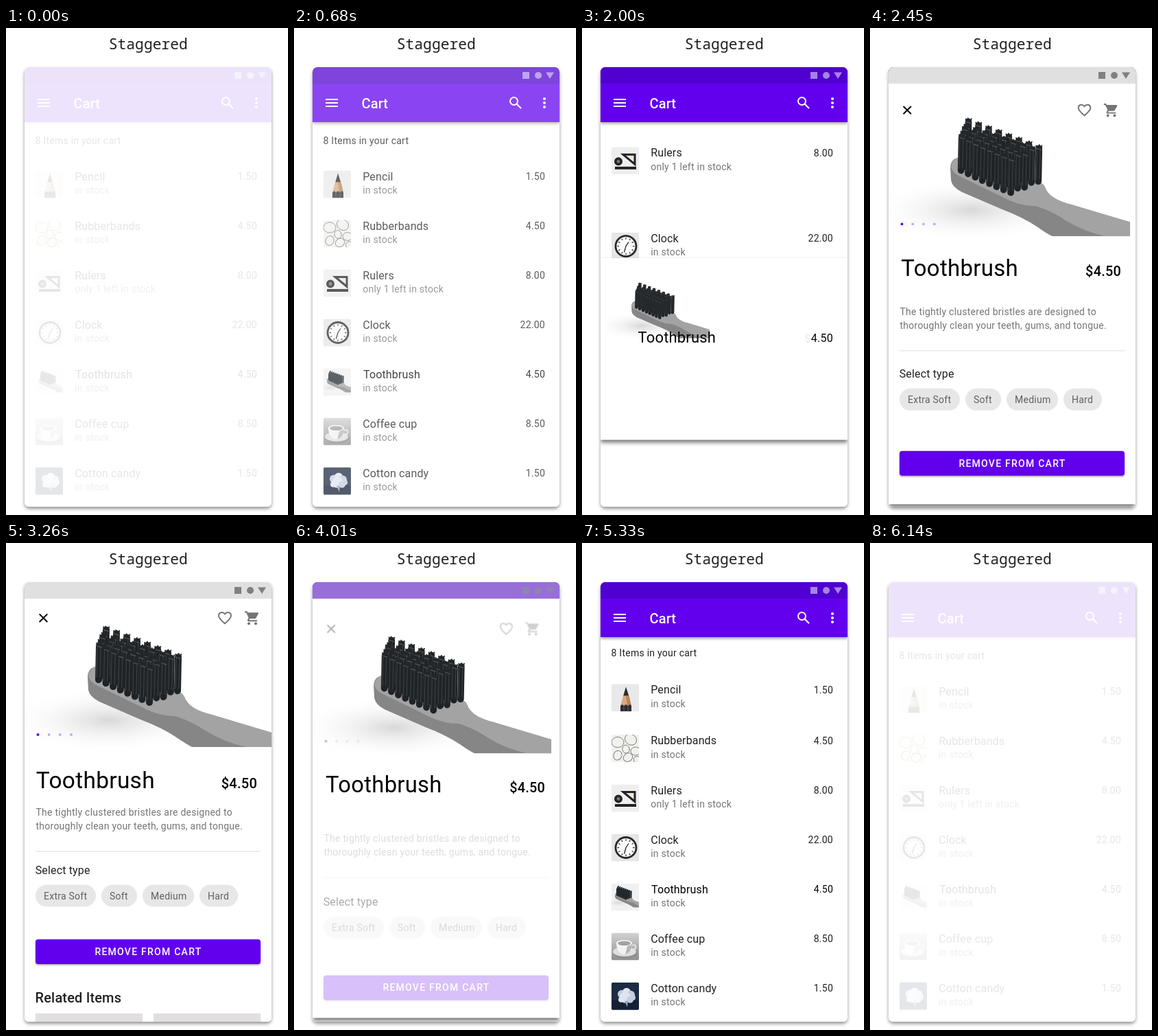
Recreate the animation shown at these times as an HTML page. Size 411 by 709 pixels, loop 8000 ms.

```html
<!DOCTYPE html>
<html lang="en">
<head>
<meta charset="utf-8">
<title>Staggered</title>
<style>
html, body { margin: 0; width: 100%; height: 100%; overflow: hidden; background: #fff; }
svg { display: block; width: 100vw; height: 100vh; }
text { font-family: Roboto, sans-serif; font-size: 14px; letter-spacing: .25px; fill: #212121; white-space: pre; }
.mono { font-family: "Noto Sans Mono", monospace; font-size: 21.3px; letter-spacing: 0; }
.item { font-size: 16px; letter-spacing: .15px; }
.dim { fill: #757575; }
.end { text-anchor: end; }
.head { font-size: 20px; font-weight: 500; letter-spacing: .15px; }
.chip { fill: #606060; }
.btn { fill: #fff; font-weight: 500; letter-spacing: 1.25px; text-anchor: middle; }
</style>
</head>
<body>
<svg id="stage" viewBox="0 0 411 709" xmlns="http://www.w3.org/2000/svg"></svg>
<script>
const LOOP = 8000, OPEN = 1334, CLOSE = 3620, SPAN = 1470;

const clamp = v => Math.min(1, Math.max(0, v));
const lerp = (a, b, p) => a + (b - a) * p;
const ramp = (t, a, b) => clamp((t - a) / (b - a));
const mix = (a, b, p) => `rgb(${a.map((v, i) => Math.round(lerp(v, b[i], p)))})`;
const quart = u => (u = clamp(u)) < .5 ? 8 * u ** 4 : 1 - 8 * (1 - u) ** 4;

const rect = (x, y, w, h, fill, more = '') =>
  `<rect x="${x}" y="${y}" width="${w}" height="${h}" fill="${fill}" ${more}/>`;
const circle = (x, y, r, fill, more = '') =>
  `<circle cx="${x}" cy="${y}" r="${r}" fill="${fill}" ${more}/>`;
const path = (d, fill, more = '') => `<path d="${d}" fill="${fill}" ${more}/>`;
const line = (d, color, w, more = '') => path(d, 'none', `stroke="${color}" stroke-width="${w}" ${more}`);
const text = (x, y, s, cls = '', more = '') => `<text x="${x}" y="${y}" class="${cls}" ${more}>${s}</text>`;

// Thumbnails, drawn in a 40 by 40 box
const loops = [[9, 11, 9], [28, 7, 9], [21, 21, 6], [9, 30, 7], [24, 33, 7], [35, 24, 7], [38, 37, 6]];
const ticks = Array.from({ length: 12 }, (_, i) => {
  const a = i * Math.PI / 6, x = Math.cos(a), y = Math.sin(a);
  return `M${21 + x * 10} ${20 + y * 10}L${21 + x * 12.5} ${20 + y * 12.5}`;
}).join('');
const puffs = [[15, 17, 6], [22, 14, 6], [28, 18, 6], [20, 22, 8], [27, 25, 5], [14, 25, 4], [31, 22, 4]];

const thumbs = {
  pencil: rect(0, 0, 40, 40, '#e9e9eb') +
    path('M21 4L25.5 18H17Z', '#2b2b2d') +
    path('M17 17H25.5L29 32H13Z', '#d8aa80') + path('M21 17H25.5L29 32H23Z', '#b98657') +
    path('M13 32Q16 28 18 32Q21 28 24 32Q27 28 29 32V40H13Z', '#2e2e31') +
    line('M18 32V40M24 32V40', '#5c5c60', 1),
  bands: rect(0, 0, 40, 40, '#f1f1ee') +
    loops.map(([x, y, r], i) => `<ellipse cx="${x}" cy="${y}" rx="${r}" ry="${r * .85}" fill="none" stroke="#777" stroke-width=".9" transform="rotate(${i * 37} ${x} ${y})"/>`).join(''),
  rulers: rect(0, 0, 40, 40, '#eeeeef') + circle(10, 21, 4.2, '#777', 'stroke="#222" stroke-width="3.6"') +
    path('M17 11H34V25Z', '#f0e6e2', 'stroke="#222" stroke-width="3"') + rect(5, 28.5, 31, 4, '#222'),
  clock: rect(0, 0, 40, 40, '#e6e6e6') + circle(21, 20, 15, '#fbfbfb', 'stroke="#292929" stroke-width="2.8"') +
    line(ticks, '#333', 1.3) + line('M21 20L25 14M21 20L18.5 29', '#222', 1.3),
  coffee: rect(0, 0, 40, 40, 'url(#warm)') + '<ellipse cx="20" cy="29" rx="18" ry="8" fill="#8b8b8b"/>' +
    '<ellipse cx="19" cy="27.5" rx="17" ry="7" fill="#dedede"/>' +
    path('M7 15Q8 31 18 31Q29 31 30 15Z', '#f2f2f2') + path('M20 31Q29 29 30 15L24 17Z', '#b5b5b5') +
    line('M30 18Q37 17 35 22Q33 26 28 25', '#e4e4e4', 2) +
    '<ellipse cx="18.5" cy="15" rx="11.5" ry="4.5" fill="#fafafa"/><ellipse cx="18.5" cy="15.3" rx="9.5" ry="3.3" fill="#a2a2a2"/>',
  cotton: rect(0, 0, 40, 40, '#1d2b43') + rect(0, 26, 40, 14, '#142036') +
    puffs.map(([x, y, r], i) => circle(x, y, r, i % 2 ? '#dfe5f0' : '#c3cee0')).join('') + path('M19 27L24 27L23 36Z', '#93a2bc')
};

const rows = [
  // name, stock, price, picture, slot, start out, shift on return, settle time
  ['Pencil', 'in stock', '1.50', 'pencil', 0, 1250, -280, 5600],
  ['Rubberbands', 'in stock', '4.50', 'bands', 1, 1333, -200, 5500],
  ['Rulers', 'only 1 left in stock', '8.00', 'rulers', 2, 1416, -37, 5300],
  ['Clock', 'in stock', '22.00', 'clock', 3, 1480, -17.5, 5240],
  ['Coffee cup', 'in stock', '8.50', 'coffee', 5, 1389, 99, 5400],
  ['Cotton candy', 'in stock', '1.50', 'cotton', 6, 1331, 140, 5480]
].map(([name, stock, price, pic, slot, start, shift, settle], i) =>
  ({ name, stock, price, pic, y: slot * 72, start, shift, settle, id: 'row' + i }));
const caption = { id: 'caption', start: 1250, shift: -300, settle: 5660 };

const rowMarkup = r => `<g id="${r.id}"><g transform="translate(0 ${r.y})">
  <g transform="translate(43 207.5)" clip-path="url(#thumb)">${thumbs[r.pic]}</g>
  ${text(100.2, 221.5, r.name, 'item')}${text(100.2, 241, r.stock, 'dim')}${text(366, 221, r.price, 'end')}</g></g>`;

// Bristle tufts on a skewed grid, back rows first
function bristles() {
  let out = '';
  for (let j = 4; j >= 0; j--) for (let i = 0; i < 8; i++) {
    const u = i / 7, v = j / 4, n = Math.sin(i * 12.9 + j * 78.2);
    const x = lerp(lerp(136, 210, u), lerp(146, 251, u), v);
    const y = lerp(lerp(150, 182, u), lerp(128, 165, u), v) + n * 1.5;
    out += line(`M${x} ${y}L${x - 1} ${y + 49}`, '#1f2326', 10, 'stroke-linecap="round"') +
      line(`M${x - 3} ${y}l-1-5M${x} ${y}l${n}-6M${x + 3} ${y}l1.5-5`, '#26292c', 1.8) +
      line(`M${x - 3} ${y + 2}l-1 44M${x + 2} ${y + 2}l-1 44`, '#3f4549', 1) +
      line(`M${x - 4} ${y}l8 2`, '#4c5256', 1.4);
  }
  return out;
}
const brush =
  '<ellipse cx="150" cy="258" rx="150" ry="48" fill="url(#shade)"/>' +
  path('M131 180Q119 182 119 196L120 214Q122 224 136 231L196 257Q228 269 250 284Q261 292 271 297H387V276Q340 262 300 250Q266 242 260 224Q257 217 249 216Z', '#868687') +
  path('M131 180Q121 183 120 194Q122 203 136 209L206 243Q226 252 246 252Q268 258 292 274Q318 290 350 297H387V276Q340 262 300 250Q266 242 260 224Q257 217 249 216Z', '#a3a3a4') +
  bristles();

const heart = 'M12 20C6 15 3 12 3 8.5 3 3.5 9 2 12 6.2 15 2 21 3.5 21 8.5 21 12 18 15 12 20Z';
const trolley = 'M1 2V4H3L6.6 11.6 5.2 14Q4 17 7 17H19V15H7.4L8.1 13H15.6Q16.8 13 17.3 12L20.9 5.5Q21.3 4 20 4H5.2L4.3 2Z';
const tools = line('M48.7 103.4L60.3 115M60.3 103.4L48.7 115', '#000', 2) +
  `<g transform="translate(307 97.3)">${line(heart, '#757575', 2)}</g>` +
  `<g transform="translate(347 97.3)">${path(trolley, '#757575')}${circle(7, 20, 2, '#757575')}${circle(17, 20, 2, '#757575')}</g>` +
  [46.5, 62.7, 78.8, 95].map((x, i) => circle(x, 279, 2, i ? '#c6a9f6' : '#6200ee')).join('');

const chips = [[43, 88, 'Extra Soft'], [139, 52, 'Soft'], [199, 75, 'Medium'], [282, 56, 'Hard']]
  .map(([x, w, s]) => rect(x, 497.5, w, 32, '#e7e7e7', 'rx="16"') + text(x + 12, 518.5, s, 'chip')).join('');

// Blocks of the detail page: lag on arrival, settle time, lag on leaving, fade end
const blocks = [
  { id: 'about', lag: 21, settle: 2950, drop: 38, gone: 4110,
    art: text(43.5, 397, 'The tightly clustered bristles are designed to', 'dim') +
      text(43.5, 417, 'thoroughly clean your teeth, gums, and tongue.', 'dim') + rect(43, 448.5, 328, 1, '#dedede') },
  { id: 'type', lag: 27.5, settle: 3030, drop: 46, gone: 4200,
    art: text(42.7, 481.5, 'Select type', 'item') },
  { id: 'chips', lag: 27.5, settle: 3030, drop: 46, gone: 4100, art: chips },
  { id: 'remove', lag: 39, settle: 3150, drop: 52, gone: 4110,
    art: rect(43, 577, 328, 36, '#6200ee', 'rx="4" filter="url(#low)"') + text(207.5, 600, 'REMOVE FROM CART', 'btn') },
  { id: 'related', lag: 52, settle: 3260, drop: 60, gone: 4110,
    art: text(42.6, 669, 'Related Items', 'head') + rect(43, 685, 156, 60, '#e1dfe0') + rect(215, 685, 156, 60, '#e1dfe0') }
];

const shadow = (id, dy, blur, alpha) => `<filter id="${id}" x="-20%" y="-30%" width="140%" height="160%">
  <feDropShadow dx="0" dy="${dy}" stdDeviation="${blur}" flood-opacity="${alpha}"/></filter>`;

document.getElementById('stage').innerHTML = `<defs>
  <clipPath id="phone"><rect x="27" y="57" width="360" height="640" rx="7"/></clipPath>
  <clipPath id="thumb"><rect width="40" height="40" rx="2"/></clipPath>
  <clipPath id="crop"><rect id="cropBox"/></clipPath>
  <radialGradient id="shade"><stop offset="0" stop-color="#d8d8d8"/><stop offset="1" stop-color="#fff" stop-opacity="0"/></radialGradient>
  <linearGradient id="warm" x2="0" y2="1"><stop stop-color="#d2d2d2"/><stop offset="1" stop-color="#8f8f8f"/></linearGradient>
  ${shadow('high', 3, 2.6, .42)}${shadow('lift', 4, 3, .58)}${shadow('mid', 2, 2, .4)}${shadow('low', 1.5, 1, .35)}
</defs>
${rect(0, 0, 411, 709, '#fff')}
${text(207.3, 31, 'Staggered', 'mono', 'text-anchor="middle"')}
${rect(27, 57, 360, 640, '#fff', 'rx="7" filter="url(#high)"')}
<g id="screen" clip-path="url(#phone)">
  ${rect(27, 57, 360, 640, '#fff')}
  <g id="caption">${text(42.5, 169, '8 Items in your cart')}</g>
  ${rows.map(rowMarkup).join('')}
  ${rect(27, 57, 360, 80, '#6200ee', 'filter="url(#mid)"')}
  ${line('M46 104H64M46 109H64M46 114H64', '#fff', 2)}
  ${text(98.5, 117, 'Cart', 'head', 'style="fill:#fff"')}
  ${circle(320.5, 106.5, 5.5, 'none', 'stroke="#fff" stroke-width="2"')}${line('M324.5 110.5L331 117', '#fff', 2.2)}
  ${[103, 109, 115].map(y => circle(365, y, 2, '#fff')).join('')}
  <rect id="cast" x="27" width="360" fill="#fff" filter="url(#lift)"/>
  <rect id="sheet" x="27" width="360"/>
  <g clip-path="url(#crop)">
    <rect id="back" x="43" y="495.5" width="40" height="40" fill="#f1f1f1"/>
    <g id="photo">${brush}</g>
  </g>
  <g id="tools">${tools}</g>
  <text id="name" class="item" style="fill:#000">Toothbrush</text>
  <text id="stock" class="dim">in stock</text>
  <text id="price" class="end" style="fill:#000"><tspan id="dollar">$</tspan>4.50</text>
  ${blocks.map(b => `<g id="${b.id}">${b.art}</g>`).join('')}
  <rect id="status" x="27" y="57" width="360" height="24"/>
  <g id="signs"><rect x="333" y="64" width="10" height="10"/><circle cx="356" cy="69" r="5"/><path d="M367 64.5H379L373 74Z"/></g>
</g>`;

const els = {};
document.querySelectorAll('[id]').forEach(e => els[e.id] = e);
const set = (id, attrs) => { for (const k in attrs) els[id].setAttribute(k, attrs[k]); };

function rowShift(r, t) {
  if (t < CLOSE) return Math.sign(r.shift) * Math.min(700, 8.9e-7 * Math.max(0, t - r.start) ** 3);
  const left = Math.max(0, r.settle - t) / (r.settle - 4700);
  return Math.sign(r.shift) * Math.min(700, Math.abs(r.shift) * left ** 4);
}

function draw(t) {
  const closing = t >= CLOSE;
  const p = closing ? 1 - quart((t - CLOSE) / SPAN) : quart((t - OPEN) / SPAN);

  for (const r of [caption, ...rows]) set(r.id, { transform: `translate(0 ${rowShift(r, t)})` });

  const top = lerp(478, 57, p), box = { y: top, height: lerp(549, 697, p) - top };
  const press = closing ? 0 : ramp(t, 1250, 1400) * (1 - ramp(t, 1560, 1800));
  set('cast', { ...box, opacity: clamp(p * 3) });
  set('sheet', { ...box, fill: mix([255, 255, 255], [240, 240, 240], press), opacity: clamp(press + p * 100) });

  const left = lerp(43, 27, p), head = lerp(495.5, 57, p);
  set('cropBox', { x: left, y: head, width: lerp(83, 387, p) - left, height: lerp(535.5, 297, p) - head });
  set('back', { opacity: clamp(1 - p * 15) });
  set('photo', { transform: `translate(${lerp(31.4, 27, p)} ${lerp(487.4, 57, p)}) scale(${lerp(.18, 1, p)}) translate(-27 -57)` });
  set('tools', {
    transform: `translate(${left} ${head}) scale(${lerp(40, 360, p) / 360}) translate(-27 -57)`,
    opacity: closing ? 1 - ramp(t, 3700, 4170) : ramp(t, 2120, 2380)
  });

  const base = lerp(509.5, 357, p);
  set('name', { transform: `translate(${lerp(101, 43.8, p)} ${base}) scale(${lerp(1, 2.09, p)})` });
  set('stock', { x: lerp(100.2, 42, p), y: base + 19.5, opacity: clamp(1.2 - p * 5) });
  set('price', { x: 366, y: lerp(509, 357, p) });
  els.price.style.fontSize = lerp(14, 20, p) + 'px';
  els.price.style.fontWeight = p > .5 ? 500 : 400;
  els.dollar.style.fillOpacity = ramp(p, .3, .7);

  for (const b of blocks) {
    const y = closing ? b.drop * ((t - CLOSE) / 390) ** 3
      : b.lag * (Math.max(0, b.settle - t) / (b.settle - 2450)) ** 3;
    set(b.id, {
      transform: `translate(0 ${Math.min(y, 200)})`,
      opacity: closing ? 1 - ramp(t, 3700, b.gone) : ramp(t, 2120, 2380)
    });
  }

  const pale = closing ? 1 - ramp(t, 3800, 4220) : ramp(t, 2080, 2380);
  set('status', { fill: mix([80, 0, 208], [224, 224, 224], pale) });
  set('signs', { fill: mix([165, 132, 232], [128, 128, 128], pale) });

  set('screen', { opacity: 1 - .89 * (t < 3000 ? 1 - ramp(t, 470, 770) : ramp(t, 5840, 6140)) });
}

const begin = performance.now();
function tick() {
  draw((performance.now() - begin) % LOOP);
  requestAnimationFrame(tick);
}
draw(0);
requestAnimationFrame(tick);
</script>
</body>
</html>
```
